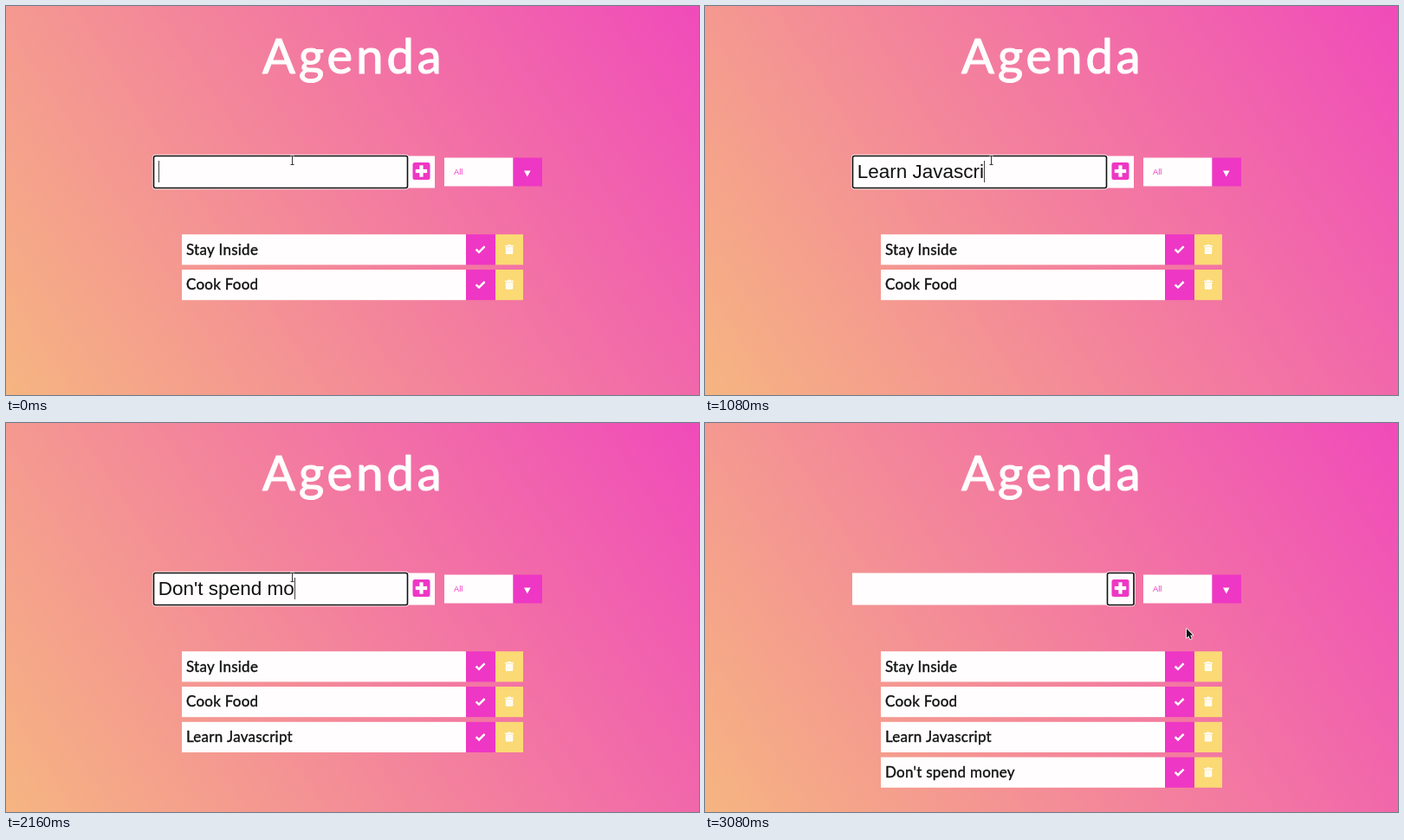
An HTML page with a canvas that plays this animation: 800 by 450 pixels, repeating every 3.12 s.

```html
<!DOCTYPE html>
<html lang="en">
<head>
<meta charset="utf-8">
<title>Agenda</title>
<style>
html, body { margin: 0; width: 100%; height: 100%; overflow: hidden; }
canvas { display: block; width: 800px; height: 450px; }
</style>
</head>
<body>
<canvas id="stage" width="800" height="450"></canvas>
<script>
const ctx = document.getElementById('stage').getContext('2d');
const LOOP = 3120;
const PINK = '#ee37c4', YELLOW = '#fbd974', WHITE = '#fffdfd';
const ROUND = 'Lato, "Open Sans", sans-serif';
const ARIAL = '"Liberation Sans", Arial, sans-serif';

const typing = [
  { text: 'Learn Javascript', start: 0, step: 76, submit: 1260 },
  { text: "Don't spend money", start: 1470, step: 48, submit: 2740 }
];
const caretOff = [2500, 2750];
// Pointer path: time, x, y
const path = [[2520, 330, 173], [2680, 479, 193], [2800, 479, 193], [3060, 556, 238]];

function rect(x, y, w, h, color) {
  ctx.fillStyle = color;
  ctx.fillRect(x, y, w, h);
}

function rounded(x, y, w, h, r) {
  ctx.beginPath();
  ctx.roundRect(x, y, w, h, r);
}

function poly(points, close) {
  ctx.beginPath();
  points.forEach(([x, y]) => ctx.lineTo(x, y));
  if (close) ctx.closePath();
}

function label(text, x, y, size, color, spacing) {
  ctx.font = `400 ${size}px ${ROUND}`;
  ctx.letterSpacing = spacing + 'px';
  ctx.fillStyle = ctx.strokeStyle = color;
  ctx.lineWidth = size * 0.022;
  ctx.lineJoin = 'round';
  ctx.fillText(text, x, y);
  ctx.strokeText(text, x, y);
  ctx.letterSpacing = '0px';
}

function background() {
  const a = 57 * Math.PI / 180;
  const half = (800 * Math.sin(a) + 450 * Math.cos(a)) / 2;
  const dx = Math.sin(a) * half, dy = Math.cos(a) * half;
  const g = ctx.createLinearGradient(400 - dx, 225 + dy, 400 + dx, 225 - dy);
  g.addColorStop(0, '#f6b581');
  g.addColorStop(1, '#f04bba');
  rect(0, 0, 800, 450, g);
}

function focusRing(x, y, w, h) {
  ctx.strokeStyle = '#fff';
  ctx.lineWidth = 1;
  rounded(x - 0.7, y - 0.7, w + 1.4, h + 1.4, 3);
  ctx.stroke();
  ctx.strokeStyle = '#101010';
  ctx.lineWidth = 1.6;
  rounded(x + 0.5, y + 0.5, w - 1, h - 1, 2);
  ctx.stroke();
}

function form() {
  rect(170, 173.5, 325, 37, WHITE);
  ctx.fillStyle = PINK;
  rounded(469.5, 181, 20, 20, 2.5);
  ctx.fill();
  rect(472.8, 188.9, 13.4, 4.2, '#fff');
  rect(477.4, 184.3, 4.2, 13.4, '#fff');

  rect(506, 175.5, 79.5, 33, WHITE);
  rect(585.5, 175.5, 33.5, 33, PINK);
  ctx.font = `9.3px ${ARIAL}`;
  ctx.fillText('All', 517, 195);
  ctx.fillStyle = '#fff';
  poly([[598, 190.5], [605.6, 190.5], [601.8, 197.5]], true);
  ctx.fill();
}

function trash(x, y) {
  rect(x - 5, y - 4.6, 10, 1.5, '#fff');
  rect(x - 1.8, y - 5.6, 3.6, 1.2, '#fff');
  ctx.fillStyle = '#fff';
  rounded(x - 4.2, y - 2.5, 8.4, 8, [0, 0, 1.2, 1.2]);
  ctx.fill();
  [-2, 0, 2].forEach(d => rect(x + d - 0.25, y - 1, 0.5, 5, 'rgba(251,217,116,.6)'));
}

function row(text, i) {
  const y = 264.2 + i * 40.8, mid = y + 17.3;
  rect(203, y, 328, 35.2, WHITE);
  rect(531, y, 34, 35.2, PINK);
  rect(565, y, 32, 35.2, YELLOW);
  label(text, 208, y + 23.3, 17, '#111', 0.25);
  ctx.strokeStyle = '#fff';
  ctx.lineWidth = 2.5;
  ctx.lineJoin = 'miter';
  poly([[542.6, mid], [546, mid + 3.3], [552.6, mid - 3.3]]);
  ctx.stroke();
  trash(581, mid);
}

function beam(x, y) {
  const stroke = (color, width) => {
    ctx.strokeStyle = color;
    ctx.lineWidth = width;
    ctx.beginPath();
    ctx.moveTo(x, y - 5);
    ctx.lineTo(x, y + 5);
    [-5, 5].forEach(d => {
      ctx.moveTo(x - 2, y + d);
      ctx.lineTo(x + 2, y + d);
    });
    ctx.stroke();
  };
  stroke('rgba(255,255,255,.8)', 2.4);
  stroke('#333', 1);
}

function arrow(x, y) {
  const shape = [[0, 0], [0, 10.5], [2.4, 8.3], [4, 12], [5.8, 11.2], [4.2, 7.6], [7.4, 7.4]];
  poly(shape.map(([dx, dy]) => [x + dx, y + dy]), true);
  ctx.lineJoin = 'round';
  ctx.strokeStyle = '#fff';
  ctx.lineWidth = 1.6;
  ctx.stroke();
  ctx.fillStyle = '#111';
  ctx.fill();
}

function pointer(t) {
  let x = path[0][1], y = path[0][2];
  for (let i = 1; i < path.length; i++) {
    const [t0, x0, y0] = path[i - 1], [t1, x1, y1] = path[i];
    if (t < t0) break;
    const k = Math.min(1, (t - t0) / (t1 - t0));
    const e = k * k * (3 - 2 * k);
    x = x0 + (x1 - x0) * e;
    y = y0 + (y1 - y0) * e;
  }
  if (x < 464) beam(x + 0.5, y + 5.5);
  else arrow(x, y);
}

function draw(t) {
  background();
  label('Agenda', 296, 78, 56, '#fffdfd', 4);
  form();

  const done = typing.filter(e => t >= e.submit);
  const items = ['Stay Inside', 'Cook Food', ...done.map(e => e.text)];
  items.forEach(row);

  const entry = typing[done.length];
  if (entry) {
    const count = Math.max(0, Math.floor((t - entry.start) / entry.step));
    const typed = entry.text.slice(0, count);
    focusRing(170, 173, 294, 38);
    ctx.font = `22.5px ${ARIAL}`;
    ctx.fillStyle = '#111';
    ctx.fillText(typed, 175.8, 199.3);
    if (t < caretOff[0] || t >= caretOff[1]) {
      rect(Math.round(176 + ctx.measureText(typed).width), 179, 1, 25, '#444');
    }
  } else {
    focusRing(464, 173, 31.5, 38);
  }
  pointer(t);
}

const begin = performance.now();
function tick() {
  draw((performance.now() - begin) % LOOP);
  requestAnimationFrame(tick);
}
tick();
</script>
</body>
</html>
```
